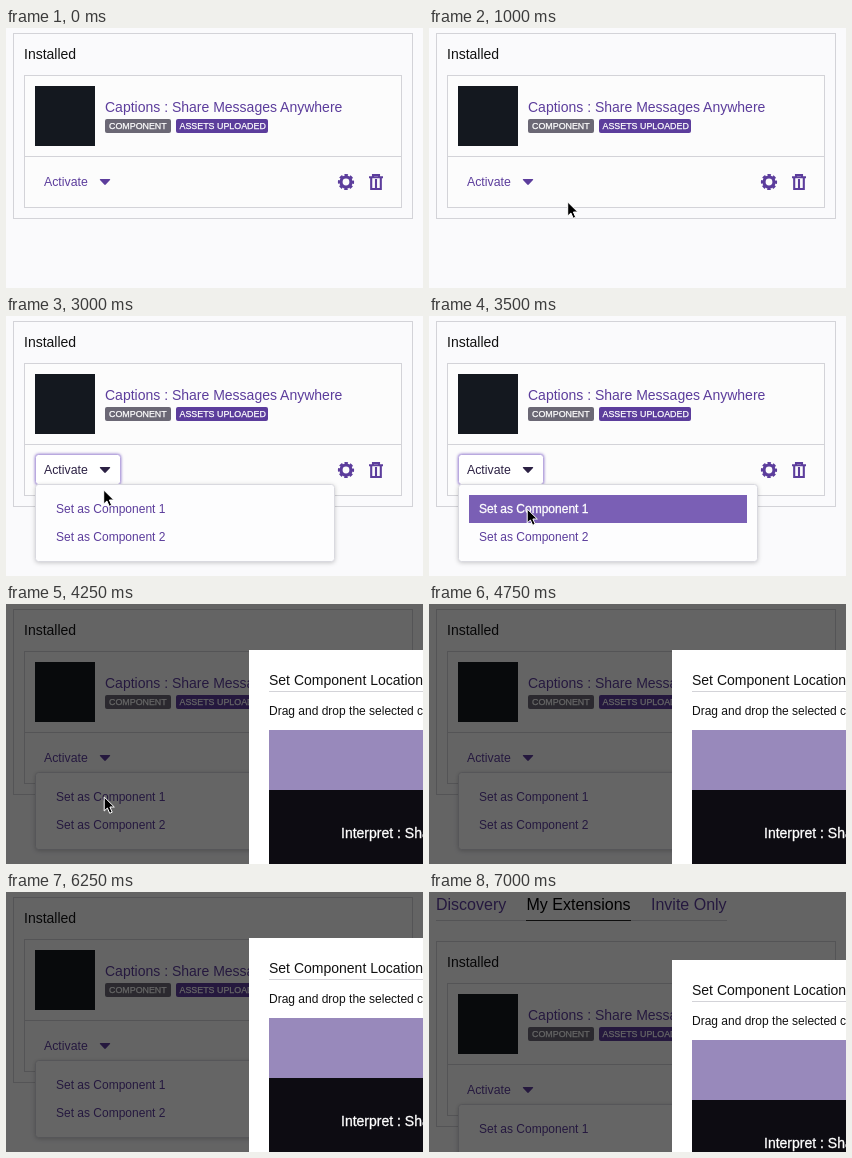
Write an HTML page that moves like this. It is 417x260 px and loops after 7250 ms.

```html
<!DOCTYPE html>
<html lang="en">
<head>
<meta charset="utf-8">
<title>Extension activation</title>
<style>
html, body { margin: 0; width: 100%; height: 100%; overflow: hidden; background: #fafafc; }
svg { display: block; font: 14px "Liberation Sans", Arial, sans-serif; --violet: #5c3d9c; }
.violet { fill: var(--violet); }
.line { fill: none; stroke: #d3d3d8; }
.small { font-size: 12px; }
.tabs { font-size: 16px; }
.badge { font-size: 8.9px; fill: #fff; stroke: #fff; stroke-width: .25; }
.icon { fill: none; stroke: var(--violet); }
.glow { filter: drop-shadow(0 0 1.5px #8a70c8); }
.shadow { filter: drop-shadow(0 1px 2px #0003); }
</style>
</head>
<body>
<svg width="417" height="260" viewBox="0 0 417 260">
  <rect width="417" height="260" fill="#fafafc"/>

  <g id="page">
    <g class="tabs">
      <path class="line" d="M7 -15.5H298"/>
      <path d="M97 -15.5H202" stroke="#222"/>
      <text class="violet" x="7" y="-26">Discovery</text>
      <text x="97.5" y="-26">My Extensions</text>
      <text class="violet" x="222" y="-26">Invite Only</text>
    </g>

    <rect class="line" x="7.5" y="5.5" width="399" height="185"/>
    <text x="18" y="31" fill="#111">Installed</text>
    <rect x="18.5" y="47.5" width="377" height="132" fill="#fcfcfc" stroke="#d3d3d8"/>
    <path class="line" d="M18 128.5H396"/>
    <rect x="29" y="58" width="60" height="60" fill="#14181f"/>
    <text class="violet" x="99" y="84">Captions : Share Messages Anywhere</text>
    <rect x="99" y="91" width="66" height="14" rx="2" fill="#6b6875"/>
    <rect class="violet" x="170" y="91" width="92" height="14" rx="2"/>
    <g class="badge">
      <text x="103" y="101">COMPONENT</text>
      <text x="173.5" y="101">ASSETS UPLOADED</text>
    </g>

    <g class="icon">
      <circle cx="340" cy="154" r="5" stroke-width="3.2"/>
      <circle cx="340" cy="154" r="7" stroke-width="2.2" stroke-dasharray="3.4 2.1" stroke-dashoffset="1.7"/>
      <path d="M363 149.2H377M367 149V147H373V149M365.2 149V161H374.8V149M370 151V160" stroke-width="2.1"/>
    </g>

    <rect id="hover" x="29" y="139" width="84" height="30" rx="3" fill="#f8f8fb"/>
    <rect id="focus" class="glow" x="29.5" y="138.5" width="85" height="30" rx="3" fill="#fff" stroke="#b9a9df"/>
    <g id="button">
      <text x="38" y="158" font-size="12.3">Activate</text>
      <path d="M94.5 151H103.5Q104.8 151 104 152L99.8 156.6Q99 157.4 98.2 156.6L94 152Q93.2 151 94.5 151Z"/>
    </g>

    <g id="menu" class="small">
      <rect class="shadow" x="29.5" y="168.5" width="299" height="77" rx="3" fill="#fdfdfe" stroke="#d9d9df"/>
      <rect id="mark" x="40" y="179" width="278" height="28" fill="#7a5fb5"/>
      <text id="first" x="50" y="197" stroke-width=".3">Set as Component 1</text>
      <text class="violet" x="50" y="225">Set as Component 2</text>
    </g>
  </g>

  <g id="dialog">
    <rect width="417" height="260" opacity=".6"/>
    <g id="sheet">
      <rect x="243" y="46" width="174" height="220" fill="#fff"/>
      <text x="263" y="81" fill="#111">Set Component Location</text>
      <path class="line" d="M263 87.5H417"/>
      <text class="small" x="263" y="111" fill="#111">Drag and drop the selected component</text>
      <rect x="263" y="126" width="154" height="60" fill="#9889bb"/>
      <rect x="263" y="186" width="154" height="80" fill="#0d0c12"/>
      <text x="335" y="234" fill="#fff" stroke="#fff" stroke-width=".3">Interpret : Share Messages</text>
    </g>
  </g>

  <path id="cursor" d="M.7 1V15L3.9 12L6.2 17.3L8.7 16.2L6.4 11H10.8Z" stroke="#fff" stroke-linejoin="round"/>
</svg>
<script>
const LOOP = 7250;
const $ = id => document.getElementById(id);
const show = (id, on) => $(id).style.display = on ? "" : "none";
const move = (id, x, y) => $(id).setAttribute("transform", `translate(${x} ${y})`);

// Pointer stops: start time, x, y
const stops = [
  [500, 296, 190], [750, 325, 169], [1000, 138, 173], [1250, 73, 165],
  [1500, 69, 157], [2250, 95, 152.5], [3000, 97, 173], [3250, 96.5, 190], [3500, 97.5, 192]
];

function draw(t) {
  const between = (a, b) => t >= a && t < b;
  const scrolled = between(5250, 6250) || t >= 7000;
  const marked = between(3250, 4250);

  move("page", 0, scrolled ? 44 : 0);
  move("sheet", 0, scrolled ? 22 : 0);
  show("hover", between(2250, 2500));
  show("focus", between(2500, 4250));
  show("menu", t >= 2500);
  show("mark", marked);
  show("dialog", t >= 4250);
  $("button").setAttribute("fill", between(2250, 4250) ? "#2c2144" : "#5c3d9c");
  $("first").setAttribute("fill", marked ? "#fff" : "#5c3d9c");
  $("first").setAttribute("stroke", marked ? "#fff" : "none");

  const stop = stops.findLast(s => s[0] <= t);
  show("cursor", stop && t < 4750);
  if (stop) move("cursor", stop[1], stop[2]);
}

const start = performance.now();
function tick() {
  draw((performance.now() - start) % LOOP);
  requestAnimationFrame(tick);
}
tick();
</script>
</body>
</html>
```
